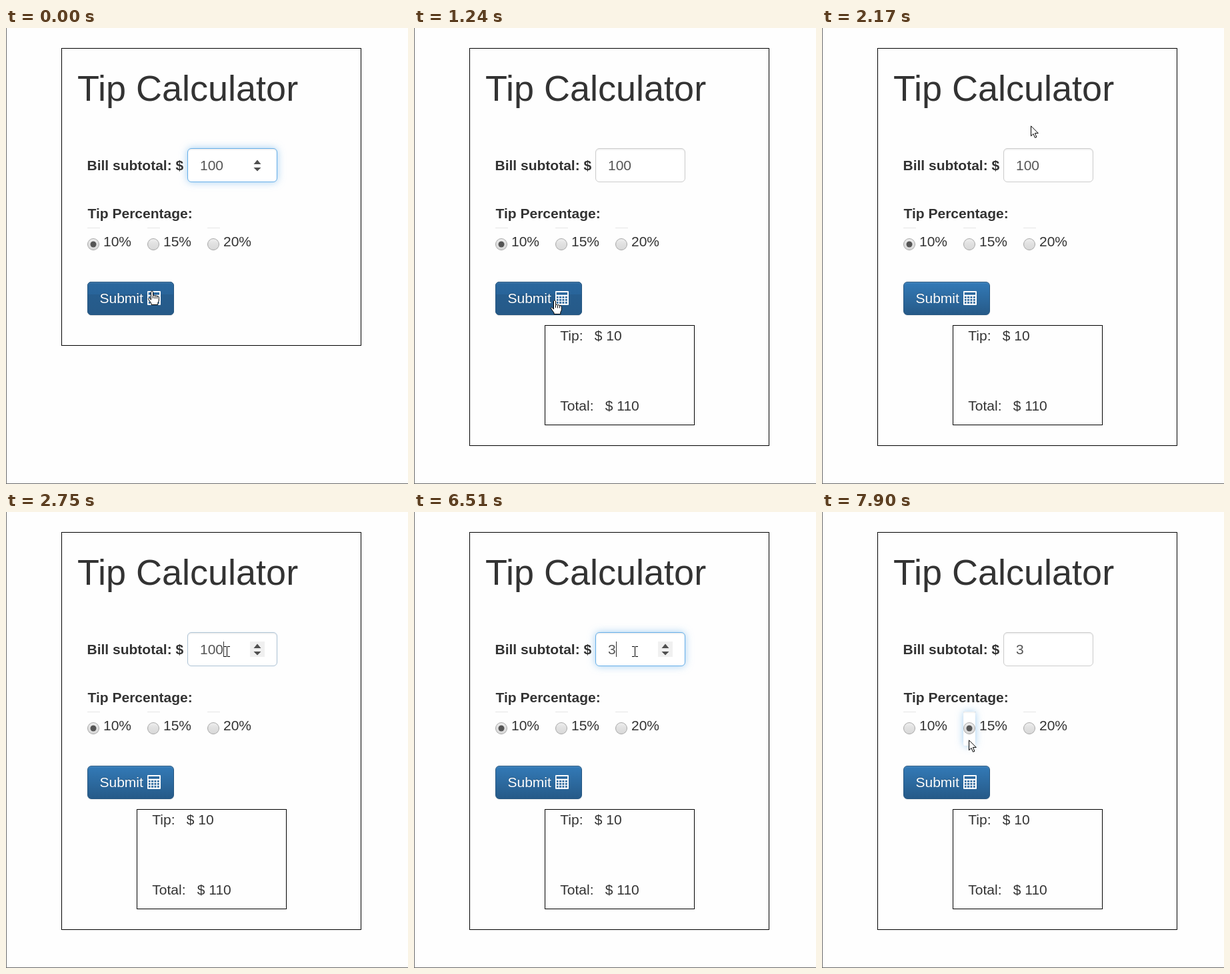
An HTML page for the animation above (8000 ms loop, 603x683 px).

```html
<!DOCTYPE html>
<html lang="en">
<head>
<meta charset="utf-8">
<title>Tip Calculator</title>
<style>
html, body { margin: 0; width: 100%; height: 100%; overflow: hidden; background: #fefefe; }
.stage { position: relative; width: 603px; height: 683px; overflow: hidden; }
.stage > * { position: absolute; box-sizing: border-box; }
.stage *, .stage { animation: 8s step-end infinite; }
svg { left: 0; top: 0; }
text { font: 21px "Liberation Sans", Arial, sans-serif; fill: #333; white-space: pre; }
.bold { font-weight: bold; }

.edge { inset: 0; border: solid #6c6c6c; border-width: 0 0 1px 1px; }
.card { left: 83px; top: 30px; width: 450px; height: 446px; border: 1px solid #000; animation-name: grow; }
.field { left: 272px; top: 180px; width: 135px; height: 51px; border: 1px solid #ccc; border-radius: 6px; background: #fff; animation-name: focus; }
.button {
  left: 122px; top: 380px; width: 130px; height: 50px; border: 1px solid #245580; border-radius: 6px;
  background: linear-gradient(#337ab7, #265a88);
  box-shadow: inset 0 1px 0 rgba(255,255,255,.15), 0 1px 1px rgba(0,0,0,.075);
}
.hover { background: linear-gradient(#2b689e, #28649a 18px, #265d8e 18px, #265a88); animation-name: hover; }
.ring { left: 121px; top: 379px; width: 132px; height: 52px; border: 1px solid #6c9fe4; border-radius: 6px; animation-name: ring; }
.tick { top: 299px; width: 19px; height: 1px; background: #e6e6e6; }
.halo {
  left: 212px; top: 299px; width: 18px; height: 51px; border-radius: 2px; background: #fff; opacity: 0;
  box-shadow: inset 0 1.5px 1.5px rgba(0,0,0,.075), 0 0 12px rgba(102,175,233,.6);
  animation-name: picked;
}

.caret { fill: #333; animation-name: caret; }
.select { fill: #3390ff; animation-name: select; }
.old { fill: #555; animation-name: old; }
.new { fill: #555; animation-name: typed; }
.spin { fill: #505050; animation-name: spin; }
.spinbg { fill: #f0f0f0; animation-name: beam; }
.result { animation-name: result; }
.first { animation-name: unpicked; }
.press { animation-name: press; }
.second { animation-name: picked; }
.submit { fill: #fff; text-shadow: 0 -1px 0 rgba(0,0,0,.2); }
.pointer { animation-name: move; }
.pointer path { fill: #fff; stroke: #000; }
.hand { animation-name: hand; }
.arrow { animation-name: arrow; }
.beam { animation-name: beam; }

/* Percent = milliseconds / 80 */
@keyframes grow { 0% { height: 446px } 15.5%, 100% { height: 596px } }
@keyframes result { 0% { opacity: 0 } 15.5%, 100% { opacity: 1 } }
@keyframes focus {
  0%, 37.75% { border-color: #66afe9; box-shadow: inset 0 1.5px 1.5px rgba(0,0,0,.075), 0 0 12px rgba(102,175,233,.6); }
  13.625% { border-color: #83bbe4; box-shadow: inset 0 1.5px 1.5px rgba(0,0,0,.075), 0 0 9px rgba(102,175,233,.4); }
  15.5%, 98.75%, 100% { border-color: #ccc; box-shadow: inset 0 1.5px 1.5px rgba(0,0,0,.075); }
  34.375% { border-color: #b0c4d5; box-shadow: inset 0 1.5px 1.5px rgba(0,0,0,.075), 0 0 3px rgba(102,175,233,.1); }
  36.125% { border-color: #7fb7e2; box-shadow: inset 0 1.5px 1.5px rgba(0,0,0,.075), 0 0 9px rgba(102,175,233,.45); }
}
@keyframes hover { 0% { opacity: 1 } 18.875%, 100% { opacity: 0 } }
@keyframes ring { 0%, 15.5%, 100% { opacity: 0 } 13.625% { opacity: 1 } }
@keyframes caret {
  0%, 8.125% { opacity: 0; transform: translateX(326px) }
  1.5%, 34.375% { opacity: 1; transform: translateX(326px) }
  13.625%, 36.125% { opacity: 0; transform: translateX(326px) }
  81.375%, 95% { opacity: 1; transform: translateX(303px) }
  88.25%, 96.875%, 100% { opacity: 0; transform: translateX(303px) }
}
@keyframes select { 0%, 81.375%, 100% { opacity: 0 } 36.125% { opacity: 1 } }
@keyframes old {
  0% { opacity: 1; fill: #555 }
  36.125% { opacity: 1; fill: #fff }
  81.375%, 100% { opacity: 0; fill: #555 }
}
@keyframes typed { 0% { opacity: 0 } 81.375%, 100% { opacity: 1 } }
@keyframes spin { 0%, 30.625% { opacity: 1 } 13.625%, 96.875%, 100% { opacity: 0 } }
@keyframes press { 0% { opacity: 0 } 96.875% { opacity: .18 } 98.75%, 100% { opacity: 0 } }
@keyframes picked { 0% { opacity: 0 } 98.75%, 100% { opacity: 1 } }
@keyframes unpicked { 0% { opacity: 1 } 98.75%, 100% { opacity: 0 } }
@keyframes hand { 0%, 15.5% { opacity: 1 } 13.625%, 18.875%, 100% { opacity: 0 } }
@keyframes arrow { 0%, 15.5%, 30.625% { opacity: 0 } 13.625%, 18.875%, 86.75%, 100% { opacity: 1 } }
@keyframes beam { 0%, 86.75%, 100% { opacity: 0 } 30.625% { opacity: 1 } }
@keyframes move {
  0% { transform: translate(219px, 393px) }
  1.5% { transform: translate(207px, 406px) }
  13.625% { transform: translate(211px, 407px) }
  15.5% { transform: translate(211px, 407px) }
  18.875% { transform: translate(247px, 443px) }
  20.5% { transform: translate(340px, 525px) }
  22.25% { transform: translate(346px, 533px) }
  23.875% { transform: translate(345px, 532px) }
  25.625% { transform: translate(303px, 260px) }
  27.125% { transform: translate(313px, 146px) }
  28.75% { transform: translate(322px, 152px) }
  30.625% { transform: translate(337px, 197px) }
  32.5% { transform: translate(338px, 197px) }
  34.375% { transform: translate(331px, 201px) }
  86.75% { transform: translate(331px, 290px) }
  88.25% { transform: translate(331px, 374px) }
  90.125% { transform: translate(296px, 345px) }
  91.625% { transform: translate(240px, 304px) }
  93.125% { transform: translate(214px, 296px) }
  95% { transform: translate(219px, 322px) }
  98.75%, 100% { transform: translate(220px, 341px) }
}
</style>
</head>
<body>
<div class="stage">
  <div class="edge"></div>
  <div class="card"></div>
  <div class="field"></div>
  <div class="tick" style="left:122px"></div>
  <div class="tick" style="left:212px"></div>
  <div class="tick" style="left:302px"></div>
  <div class="halo"></div>
  <div class="button"></div>
  <div class="button hover"></div>
  <div class="ring"></div>

  <svg width="603" height="683" viewBox="0 0 603 683">
    <defs>
      <linearGradient id="dome" x2="0" y2="1">
        <stop offset="0" stop-color="#f0f0f0"/>
        <stop offset=".4" stop-color="#e2e2e2"/>
        <stop offset="1" stop-color="#d8d8d8"/>
      </linearGradient>
      <circle id="radio" r="8.5" cy="324" fill="url(#dome)" stroke="#a8a8a8"/>
      <circle id="dot" r="4.5" cy="324" fill="#555"/>
      <pattern id="keys" x="213.7" y="402" width="4.4" height="4.1" patternUnits="userSpaceOnUse">
        <rect width="3" height="2.7" fill="#28649a"/>
      </pattern>
    </defs>

    <text x="107" y="109" style="font-size:54px">Tip Calculator</text>
    <text class="bold" x="121.5" y="213">Bill subtotal: $</text>
    <text class="bold" x="122.5" y="285">Tip Percentage:</text>

    <rect class="select" x="291" y="194" width="35" height="23"/>
    <text class="old" x="291" y="213">100</text>
    <text class="new" x="291" y="213">3</text>
    <rect class="caret" y="194" width="1" height="23"/>
    <rect class="spinbg" x="366" y="194" width="22" height="23"/>
    <path class="spin" d="M371.5 204l5.5-6.5 5.5 6.5zM371.5 209h11l-5.5 5.5z"/>

    <use href="#radio" x="131"/>
    <use href="#radio" x="221"/>
    <use href="#radio" x="311"/>
    <use class="first" href="#dot" x="131"/>
    <circle class="press" cx="221" cy="324" r="8"/>
    <use class="second" href="#dot" x="221"/>
    <text x="146" y="327">10%</text>
    <text x="236" y="327">15%</text>
    <text x="326" y="327">20%</text>

    <text class="submit" x="140.5" y="412">Submit</text>
    <rect x="212" y="394" width="20" height="21" rx="1" fill="#fff"/>
    <rect x="213.7" y="396" width="16.4" height="3.7" fill="#2b689e"/>
    <rect x="213.7" y="402" width="16.4" height="11.2" fill="url(#keys)"/>

    <g class="result">
      <rect x="196.5" y="445.5" width="224" height="149" fill="none" stroke="#000"/>
      <text x="219.3" y="468">Tip:</text>
      <text x="270.7" y="468">$ 10</text>
      <text x="219.3" y="573">Total:</text>
      <text x="286.8" y="573">$ 110</text>
    </g>

    <g class="pointer">
      <path class="hand" d="M-1.5 2Q0-.5 1.5 2V7.5Q3 6.5 4.5 8Q6 7 7.3 8.7Q9.5 8 10.3 10.5V15Q10 17 8.8 18.5V21.5H-1V19.5L-5 14Q-6.3 11.8-4.3 11.3L-1.5 14ZM1.5 8v4M4.5 8.5v4M7.4 9v3.5"/>
      <path class="arrow" d="M.5.8V15.8L4 12.5 6.5 18.3 8.9 17.3 6.4 11.6H11.3Z"/>
      <path class="beam" style="fill:none" d="M-4 .5H0M1 .5H5M.5 1V15M-4 15.5H0M1 15.5H5"/>
    </g>
  </svg>
</div>
</body>
</html>
```
